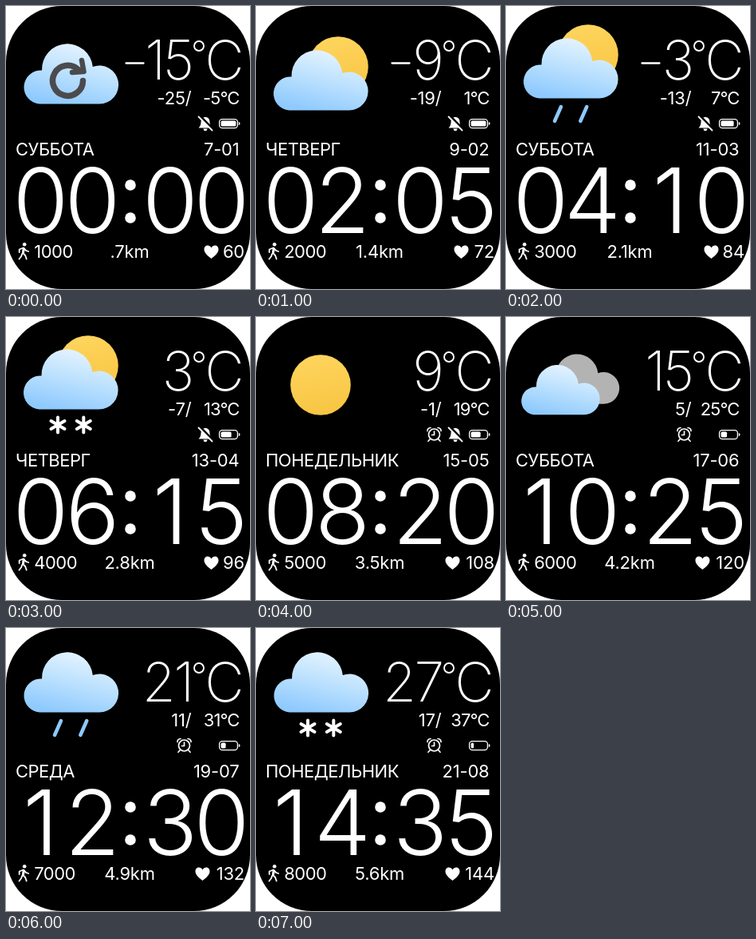
Animation, 306 px wide and 354 px high, one loop 8000 ms. Source, as an HTML page:

```html
<!DOCTYPE html>
<html lang="ru">
<head>
<meta charset="utf-8">
<title>Watch face</title>
<style>
html, body { margin: 0; width: 100%; height: 100%; overflow: hidden; background: #fff; }
svg { display: block; width: 306px; height: 354px; }
text { font: 400 22px Inter, sans-serif; letter-spacing: -.2px; fill: #fff; }
.end { text-anchor: end; }
.mid { text-anchor: middle; }
.tight { letter-spacing: -.5px; }
.thin { font-size: 68px; font-weight: 150; letter-spacing: -2.5px; }
.big { font-size: 113px; font-weight: 315; letter-spacing: 0; }
.line { fill: none; stroke: #fff; stroke-linecap: round; stroke-linejoin: round; }
</style>
</head>
<body>
<svg viewBox="0 0 306 354">
  <defs>
    <linearGradient id="sky" gradientUnits="userSpaceOnUse" x1="70" y1="0" x2="52" y2="76">
      <stop offset="0" stop-color="#e4f3ff"/>
      <stop offset=".45" stop-color="#bee2fe"/>
      <stop offset="1" stop-color="#8fcafe"/>
    </linearGradient>
    <linearGradient id="gold" x1="0" y1="0" x2=".2" y2="1">
      <stop offset="0" stop-color="#ffd65f"/>
      <stop offset="1" stop-color="#f8c644"/>
    </linearGradient>
    <path id="cloud" d="M21 74.500A21 21 0 1 1 24 32.600A32 32 0 0 1 87.800 28A24 24 0 1 1 96 74.500Z"/>
    <circle id="sun" r="37.800" fill="url(#gold)"/>
    <path id="flake" class="line" stroke-width="4" d="M0-9.500V9.500M-8.500-5L8.500 5M-8.500 5L8.500-5"/>
    <path id="drop" class="line" style="stroke:#8fc8fd" stroke-width="4.500" d="M4-9L-4 9"/>
  </defs>

  <rect width="306" height="354" rx="70"/>
  <g id="weather"></g>

  <path id="minus" class="line" stroke-width="2.300" stroke-linecap="butt" d="M0 71.500H22"/>
  <text id="temp" class="thin end" x="233.500" y="92"></text>
  <circle class="line" cx="242" cy="50" r="6" stroke-width="1.900"/>
  <text class="thin end" x="296" y="92">C</text>
  <text id="low" class="end" x="232.500" y="123"></text>
  <text id="high" class="end" style="letter-spacing:-.9px" x="292.500" y="123"></text>

  <g id="alarm" class="line" stroke-width="1.700">
    <circle cx="223.500" cy="147" r="7"/>
    <path d="M223.500 143V147.500H220.500M215 142.500Q215 138.800 219 138.500M232 142.500Q232 138.800 228 138.500M218.500 152.500L216 155.300M228.500 152.500L231 155.300"/>
  </g>
  <g id="bell">
    <path fill="#fff" d="M241.500 152.500Q244.500 150 244.500 145Q244.500 139.800 250 138.700Q255.500 139.800 255.500 145Q255.500 150 258.500 152.500ZM247.300 153.500H252.700Q252 156.200 250 156.200Q248 156.200 247.300 153.500Z"/>
    <path d="M243 137.500L259.500 154.500" stroke="#000" stroke-width="3.500"/>
    <path class="line" d="M241.500 138.500L258.500 155.500" stroke-width="1.800"/>
  </g>
  <rect class="line" x="267.600" y="141.600" width="22.800" height="11" rx="3.500" stroke-width="1.300"/>
  <path fill="#fff" d="M291.800 145Q293.600 145.500 293.600 147.100T291.800 149.200Z"/>
  <rect id="charge" x="269.600" y="143.600" height="7" rx="1.700" fill="#fff"/>

  <text id="day" class="tight" x="12" y="187"></text>
  <text id="date" class="end" x="292.500" y="187"></text>

  <g id="clock"></g>
  <circle cx="156" cy="224" r="6.800" fill="#fff"/>
  <circle cx="156" cy="265" r="6.800" fill="#fff"/>

  <g transform="translate(.7 0)">
    <circle cx="22.500" cy="298.300" r="2.300" fill="#fff"/>
    <path class="line" stroke-width="1.800" d="M16 308V304.500L21 302.500L24.500 306L27.500 307M21.500 303L20.500 309L23.500 312L25 316.500M19.500 310L18.500 313L15.800 316.500"/>
    <path class="line" stroke-width="3" d="M21.500 303.500L20.800 308.500"/>
  </g>
  <text id="steps" class="tight" x="35.200" y="315"></text>
  <text id="dist" class="mid" x="155" y="315"></text>
  <path id="heart" fill="#fff" d="M0 8.500C-4 5.500-9 1.500-9-3C-9-8-3-10 0-5C3-10 9-8 9-3C9 1.500 4 5.500 0 8.500Z"/>
  <text id="pulse" class="end" x="299" y="315"></text>
</svg>
<script>
const $ = id => document.getElementById(id);
const put = (id, s) => { $(id).textContent = s; };
const show = (id, on) => { $(id).style.display = on ? '' : 'none'; };
const pad = n => String(n).padStart(2, '0');

const use = (id, x, y, extra = '') =>
  `<use href="#${id}" transform="translate(${x} ${y}) ${extra}"/>`;
const cloud = (x, y, scale = 1, fill = 'url(#sky)') =>
  `<g fill="${fill}">${use('cloud', x, y, `scale(${scale})`)}</g>`;
const pair = (id, y) => use(id, 65, y) + use(id, 97.3, y);
const partly = y => use('sun', 103, y + 38) + cloud(20.5, y + 18);
const reload = `<g class="line" style="stroke:#4b4b4d" stroke-width="7.500">
  <path d="M96.500 93.500A19 19 0 1 1 91 80"/><path stroke-width="6.500" d="M95 68L97.500 82L83 83"/></g>`;

const skies = [
  cloud(21, 48) + reload,
  partly(38),
  partly(23) + pair('drop', 135),
  partly(23) + pair('flake', 135),
  use('sun', 81, 85),
  cloud(42.500, 47, .83, '#b3b3b3') + cloud(18, 60.500, .83),
  cloud(21, 31) + pair('drop', 125),
  cloud(21, 31) + pair('flake', 125)
];
const SAT = 'СУББОТА', THU = 'ЧЕТВЕРГ', MON = 'ПОНЕДЕЛЬНИК';
const days = [SAT, THU, SAT, THU, MON, SAT, 'СРЕДА', MON];
const charge = [18.8, 18.8, 16, 13, 12, 7.5, 6, 3.5];
const cells = [43.5, 108.5, 206, 270.5];

function draw(i) {
  const temp = 6 * i - 15, pulse = 60 + 12 * i;
  $('weather').innerHTML = skies[i];
  put('temp', Math.abs(temp));
  show('minus', temp < 0);
  $('minus').setAttribute('transform', `translate(${temp < -9 ? 150.5 : 170.5} 0)`);
  put('low', `${temp - 10}/`);
  put('high', `${temp + 10}°C`);
  show('alarm', i > 3);
  show('bell', i < 5);
  $('charge').setAttribute('width', charge[i]);
  put('day', days[i]);
  put('date', `${7 + 2 * i}-${pad(i + 1)}`);
  $('clock').innerHTML = [...pad(2 * i) + pad(5 * i)].map((d, k) =>
    `<text class="big mid" x="${cells[k]}" y="284">${d}</text>`).join('');
  put('steps', 1000 * (i + 1));
  put('dist', (.7 * (i + 1)).toFixed(1).replace(/^0/, '') + 'km');
  put('pulse', pulse);
  $('heart').setAttribute('transform', `translate(${pulse > 99 ? 246.5 : 257.5} 307.500)`);
}

let last = -1;
const start = performance.now();
function tick(now) {
  const i = Math.floor(Math.max(0, now - start) / 1000) % 8;
  if (i !== last) draw(last = i);
  requestAnimationFrame(tick);
}
tick(start);
</script>
</body>
</html>
```
